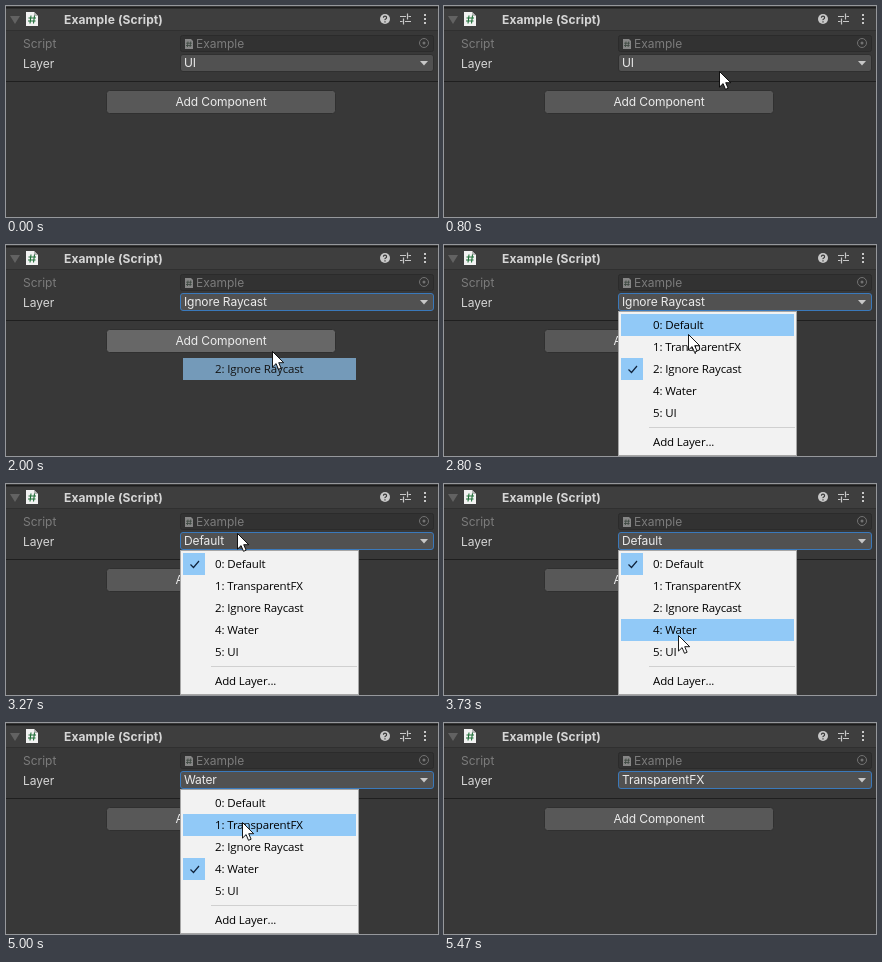
An HTML page that plays this animation: 432 px wide and 211 px high, repeating every 5.67 s.

```html
<!DOCTYPE html>
<html lang="en">
<head>
<meta charset="utf-8">
<title>Layer dropdown</title>
<style>
  html, body { margin: 0; width: 100%; height: 100%; overflow: hidden; background: #383838; }
  svg { display: block; width: 432px; height: 211px; }
  text { font: 12px Inter, sans-serif; fill: #d6d6d6; white-space: pre; }
  .bold { font-weight: 700; letter-spacing: .12px; }
  .dim { fill: #7c7c7c; }
  .bright { fill: #ececec; letter-spacing: -.1px; }
  .menu text { font: 11.5px "Open Sans", "Noto Sans", sans-serif; letter-spacing: -.13px; fill: #000; }
  .off { display: none; }
</style>
</head>
<body>
<svg viewBox="0 0 432 211">
  <rect width="432" height="211" fill="#383838"/>

  <!-- header -->
  <rect y="2" width="432" height="23" fill="#3e3e3e"/>
  <rect y="1" width="432" height="1.5" fill="#1c1c1c"/>
  <rect y="24" width="432" height="1" fill="#303030"/>
  <path d="M4 10h10l-5 8z" fill="#626262"/>
  <path d="M20 6h8l4 4v10H20z" fill="#f2f2f2"/>
  <path d="M28 6v4h4z" fill="#b5b5b5"/>
  <path d="M25 9.5l-1 8M28.5 9.5l-1 8M22.5 12h7.5M22 15h7.5" stroke="#1f6e38" stroke-width="1.1"/>
  <text class="bold" x="58" y="18">Example (Script)</text>
  <circle cx="379" cy="13" r="5" fill="#c8c8c8"/>
  <path d="M377.4 11.8q0-1.6 1.6-1.6t1.6 1.5q0 .8-.9 1.3t-.7 1.2M379 15.2v1.3" fill="none" stroke="#3a3a3a" stroke-width="1.2"/>
  <path d="M394 10.5h6M402.5 10.5h2.5M394 15.5h2.5M399 15.5h6M401.5 7.5v6M397.5 12.5v6" stroke="#c8c8c8" stroke-width="1.2"/>
  <path d="M418 8h2v2h-2zM418 12h2v2h-2zM418 16h2v2h-2z" fill="#c8c8c8"/>

  <!-- script row -->
  <text class="dim" x="17" y="42">Script</text>
  <rect x="174.5" y="29.5" width="253" height="16" rx="2" fill="#323232" stroke="#2b2b2b"/>
  <path d="M179 33h6l2 2v8h-8z" fill="#868686"/>
  <path d="M182 35.5l-.6 5.5M184.7 35.5l-.6 5.5M180.2 37.2h5.6M180 39.5h5.6" stroke="#3f4a42" stroke-width=".9"/>
  <text class="dim" x="190" y="42">Example</text>
  <circle cx="418" cy="37" r="4.5" fill="none" stroke="#727272"/>
  <circle cx="418" cy="37" r="1.5" fill="#727272"/>

  <!-- layer row -->
  <text x="17" y="62">Layer</text>
  <rect id="field" x="174.5" y="48.5" width="253" height="17" rx="2.5" fill="#515151"/>
  <text id="value" class="bright" x="178" y="61.3"></text>
  <path d="M414 55h8l-4 4.5z" fill="#c8c8c8"/>

  <rect y="75" width="432" height="1" fill="#1f1f1f"/>
  <rect id="button" x="100.5" y="84.5" width="229" height="23" rx="3" stroke="#303030"/>
  <text class="bright" x="215" y="100.4" text-anchor="middle">Add Component</text>

  <g id="menu" class="menu">
    <rect x="174.5" y="66.5" width="178" height="144" fill="#f2f2f2" stroke="#a6a6a6"/>
    <rect id="hover" x="177" width="173" height="22" fill="#91c9f7"/>
    <g id="check">
      <rect id="box" x="177" width="22" height="22" fill="#91c9f7"/>
      <path d="M184.5 11.5l3 3 5.5-6.5" fill="none" stroke="#10233c" stroke-width="1.2"/>
    </g>
    <g id="items"></g>
    <rect x="205" y="182" width="146" height="1" fill="#d0d0d0"/>
    <text x="209" y="201">Add Layer...</text>
  </g>

  <g id="flash" class="menu">
    <rect x="177" width="173" height="22" fill="#91c9f7"/>
    <text x="209" y="15"></text>
  </g>

  <path id="cursor" d="M.5.5v15.6l3.6-3.5 2.4 5.7 2.6-1.1-2.4-5.5h5z" fill="#fff" stroke="#000" stroke-width=".9"/>
</svg>

<script>
const LOOP = 5670, FPS = 15;
const TOP = 69, ROW = 22;
const ENTER = 4, SWEPT = 19, LEAVE = 82, TRAVEL = 6;
const ids = [0, 1, 2, 4, 5];
const names = ['Default', 'TransparentFX', 'Ignore Raycast', 'Water', 'UI'];

// each visit clicks the field at home, then the row at aim
const picks = [
  { open: 23, close: 29, row: 2, home: [270, 57], aim: [271, 114] },
  { open: 36, close: 44, row: 0, home: [238, 60], aim: [244, 89] },
  { open: 49, close: 61, row: 3, home: [231, 49], aim: [234, 151] },
  { open: 70, close: 78, row: 1, home: [231, 54], aim: [236, 103] }
];
const exit = { open: LEAVE, home: [53, 206] };

const $ = id => document.getElementById(id);
const show = (el, on) => el.classList.toggle('off', !on);
const shift = (el, x, y) => el.setAttribute('transform', `translate(${x} ${y})`);
const paint = (id, name, value) => $(id).setAttribute(name, value);
const label = row => `${ids[row]}: ${names[row]}`;
const ease = u => u * u * (3 - 2 * u);

names.forEach((_, row) => {
  const text = document.createElementNS('http://www.w3.org/2000/svg', 'text');
  text.setAttribute('x', 209);
  text.setAttribute('y', TOP + row * ROW + 15);
  text.textContent = label(row);
  $('items').append(text);
});

// circling arrival that rises from the bottom edge
function sweep(tick) {
  const t = tick - ENTER, angle = .551 * t - Math.PI;
  return [253 + 75 * Math.cos(angle), 82 - 35 * Math.sin(angle) + 118 * Math.exp(-t / 4)];
}

// stops as tick and point; the pointer eases from each to the next
const stops = [[SWEPT, sweep(SWEPT)], [picks[0].open - 2, picks[0].home]];
for (const { open, close, home, aim } of picks) {
  stops.push([open, home], [Math.min(open + TRAVEL, close - 1), aim], [close - 1, aim]);
}
stops.push([exit.open, exit.home]);

function pointer(tick) {
  if (tick < SWEPT) return sweep(tick);
  const next = stops.findIndex(([at]) => at > tick);
  const [t0, from] = stops[next - 1], [t1, to] = stops[next];
  const k = ease((tick - t0) / (t1 - t0));
  return from.map((v, i) => v + (to[i] - v) * k);
}

function draw(tick) {
  const inside = tick >= ENTER && tick < LEAVE;
  const [x, y] = inside ? pointer(tick).map(Math.round) : [0, 0];
  show($('cursor'), inside);
  shift($('cursor'), x, y);

  const open = picks.some(p => tick >= p.open && tick < p.close);
  const last = picks.filter(p => tick >= p.close).pop();
  const row = last ? last.row : names.indexOf('UI');
  const onButton = !open && x > 100 && x < 330 && y > 84 && y < 108;
  $('value').textContent = names[row];
  paint('field', 'stroke', tick >= picks[0].open ? '#3a79bb' : '#303030');
  paint('button', 'fill', onButton ? '#676767' : '#585858');

  show($('menu'), open);
  const over = Math.floor((y - TOP) / ROW);
  show($('hover'), over in names);
  paint('hover', 'y', TOP + over * ROW);
  paint('box', 'fill', over === row ? '#56b0fa' : '#91c9f7');
  shift($('check'), 0, TOP + row * ROW);

  // chosen row fades out after the menu closes
  const alpha = last && !open ? Math.max(0, 1 - .32 * (tick - last.close)) : 0;
  paint('flash', 'opacity', alpha);
  shift($('flash'), 0, TOP + row * ROW);
  $('flash').lastElementChild.textContent = label(row);
}

const start = performance.now();
let shown = -1;
function step() {
  const time = (performance.now() - start) % LOOP;
  const tick = Math.floor((time + 4) * FPS / 1000);
  if (tick !== shown) draw(shown = tick);
  requestAnimationFrame(step);
}
step();
</script>
</body>
</html>
```
